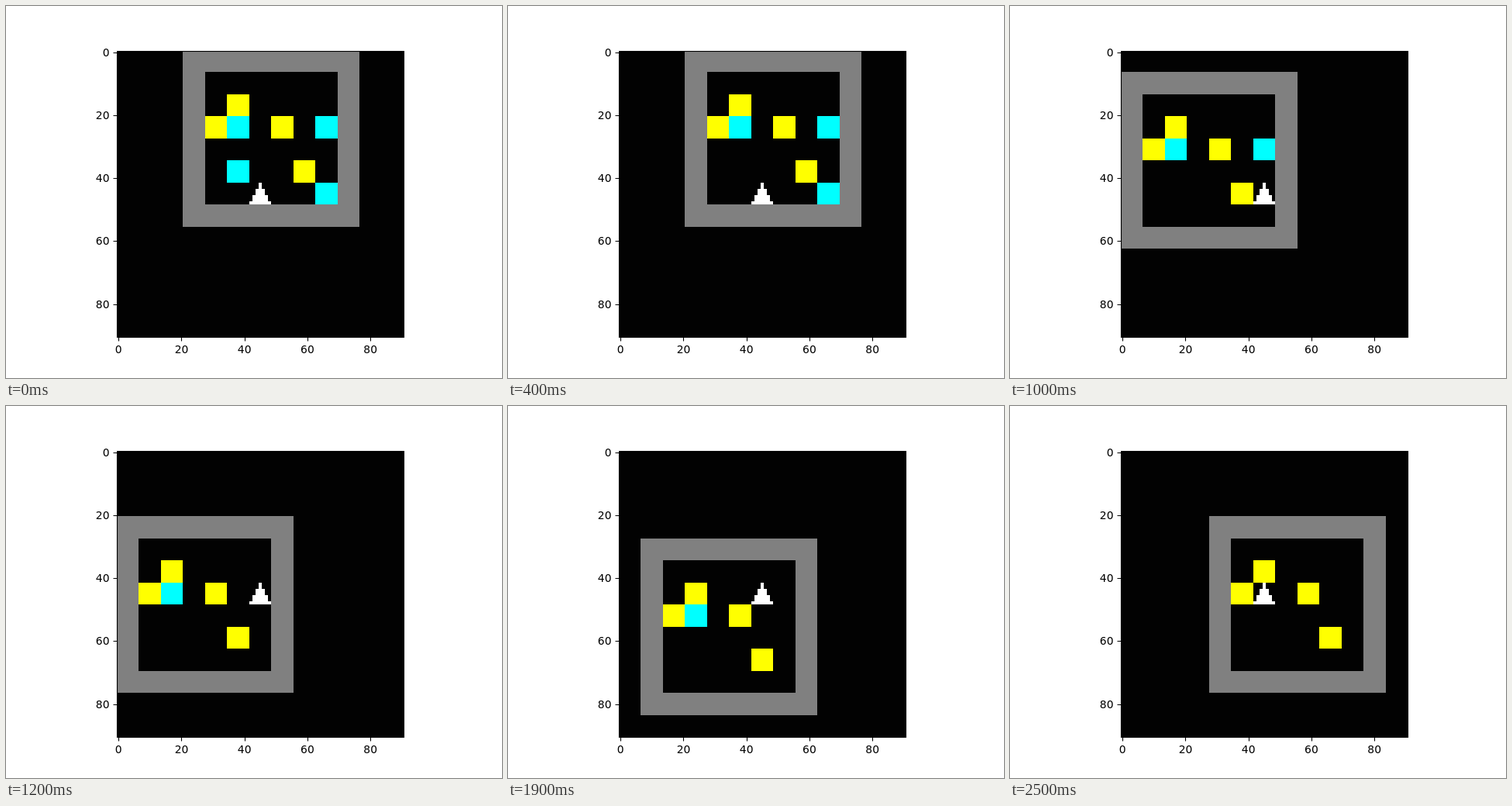
Animation, 640 px wide and 480 px high, one loop 2.6 s. Source, as an HTML page with a canvas:

```html
<!DOCTYPE html>
<html lang="en">
<head>
<meta charset="utf-8">
<title>Grid world agent</title>
<style>
  html, body { margin: 0; width: 100%; height: 100%; overflow: hidden; background: #fff; }
  canvas { display: block; }
</style>
</head>
<body>
<canvas id="stage" width="640" height="480"></canvas>
<script>
const ctx = document.getElementById('stage').getContext('2d');

const STEP_MS = 100;
const CELL = 7;           // image pixels per grid cell
const CENTER = 6;         // the view keeps the agent in this cell
const PIXEL = 370 / 91;   // screen size of one image pixel
const START = [3, 6];
const MOVES = 'ULDR.R.RRUUU.LDLRUUDDLLLU';
const DIRS = { U: [0, -1], D: [0, 1], L: [-1, 0], R: [1, 0], '.': [0, 0] };
const YELLOW = [[2, 2], [1, 3], [4, 3], [5, 5]];
const CYAN = [[2, 5], [6, 6], [6, 3], [2, 3]];

const path = [START];
for (const move of MOVES) {
  const [x, y] = path[path.length - 1];
  const [dx, dy] = DIRS[move];
  path.push([x + dx, y + dy]);
}

// Fill a box given in image pixels, snapped to the screen
const edgeX = i => Math.round(143 + i * PIXEL);
const edgeY = j => Math.max(58, Math.round(57 + j * PIXEL));
function box(color, x, y, w, h) {
  const left = edgeX(x), top = edgeY(y);
  ctx.fillStyle = color;
  ctx.fillRect(left, top, edgeX(x + w) - left, edgeY(y + h) - top);
}

function cells(color, x, y, size = 1) {
  box(color, x * CELL, y * CELL, size * CELL, size * CELL);
}

function drawWorld(step) {
  const [agentX, agentY] = path[step];
  const left = CENTER - agentX, top = CENTER - agentY;
  const visited = path.slice(0, step + 1).map(String);

  box('#020202', 0, 0, 91, 91);
  cells('#808080', left, top, 8);
  cells('#020202', left + 1, top + 1, 6);
  for (const [x, y] of YELLOW) cells('#ff0', left + x, top + y);
  for (const [x, y] of CYAN) {
    if (!visited.includes(`${x},${y}`)) cells('#0ff', left + x, top + y);
  }

  const corner = CENTER * CELL;
  for (let row = 0; row < CELL; row++) {
    const half = row >> 1;
    box('#fff', corner + 3 - half, corner + row, 2 * half + 1, 1);
  }
}

function drawAxes() {
  ctx.strokeStyle = ctx.fillStyle = '#000';
  ctx.lineWidth = 1.11;
  ctx.strokeRect(143.5, 58.5, 370, 369);
  ctx.font = '13.89px "DejaVu Sans", sans-serif';
  ctx.beginPath();
  for (let value = 0; value <= 80; value += 20) {
    const offset = (value + 0.5) * 369.6 / 91;
    const x = Math.round(143.2 + offset) + 0.5;
    const y = Math.round(57.6 + offset) + 0.5;
    ctx.moveTo(x, 428);
    ctx.lineTo(x, 432.5);
    ctx.moveTo(143, y);
    ctx.lineTo(138.5, y);
    ctx.textAlign = 'center';
    ctx.fillText(value, 143.2 + offset, 448);
    ctx.textAlign = 'right';
    ctx.fillText(value, 133.5, Math.round(62.6 + offset));
  }
  ctx.stroke();
}

function render() {
  const step = Math.floor(performance.now() / STEP_MS) % path.length;
  ctx.fillStyle = '#fff';
  ctx.fillRect(0, 0, 640, 480);
  drawWorld(step);
  drawAxes();
  requestAnimationFrame(render);
}
render();
</script>
</body>
</html>
```
